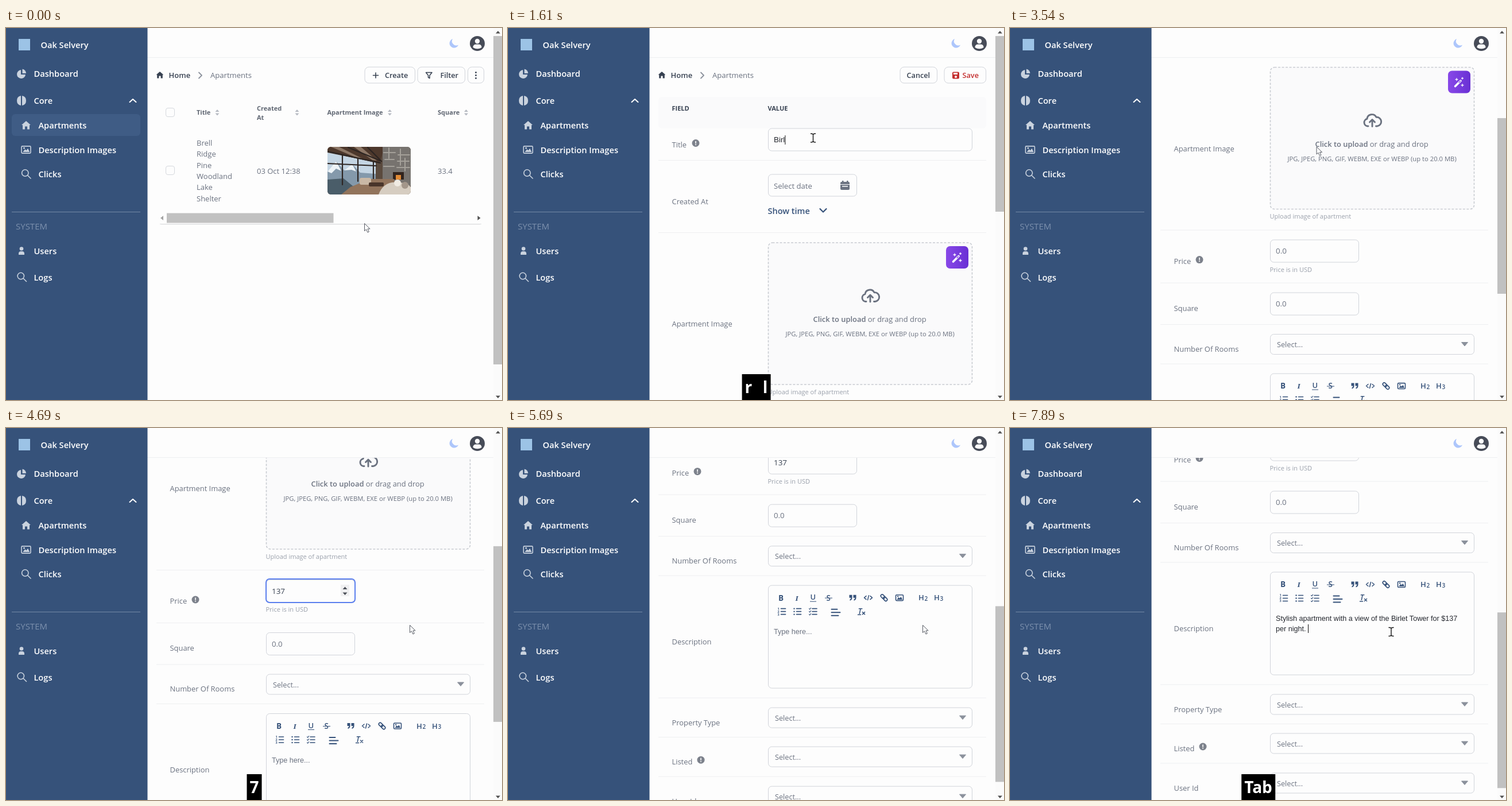
Animation of 864 by 648 pixels, one loop 8000 ms. Source, as an HTML page:

```html
<!DOCTYPE html>
<html lang="en">
<head>
<meta charset="utf-8">
<style>
html, body { margin: 0; width: 864px; height: 648px; overflow: hidden; background: #fdfdfd; }
#stage { position: relative; width: 864px; height: 648px; overflow: hidden; }
svg { display: block; font-family: "Open Sans", "Noto Sans", sans-serif; }
text { white-space: pre; }
.arial { font-family: "Liberation Sans", Arial, sans-serif; }
#keys { position: absolute; left: 432.5px; top: 603px; height: 45px; padding: 0 5.5px; transform: translateX(-50%);
  background: #000; color: #fff; font: 700 28px/44px "Open Sans", "Noto Sans", sans-serif; white-space: pre; word-spacing: 2px; }
</style>
</head>
<body>
<div id="stage"><div id="keys"></div></div>
<script>
const NAVY = '#36527a', GREY = '#6b7280', DARK = '#374151', LINE = '#eeeff1', EDGE = '#d1d4da', ICON = '#c9d2de';
const LOOP = 8000;

// Drawing helpers; text is placed by its left edge and vertical centre
const text = (x, y, s, size = 12.9, fill = GREY, weight = 400, more = '') =>
  `<text x="${x}" y="${y + size * .36}" font-size="${size}" fill="${fill}" font-weight="${weight}" ${more}>${s}</text>`;
const rect = (x, y, w, h, fill, rx = 0, more = '') =>
  `<rect x="${x}" y="${y}" width="${w}" height="${h}" rx="${rx}" fill="${fill}" ${more}/>`;
const box = (x, y, w, h, rx = 6, more = '') =>
  rect(x + .5, y + .5, w - 1, h - 1, '#fdfdfd', rx, `stroke="${EDGE}" ${more}`);
const fill = (d, color, more = '') => `<path d="${d}" fill="${color}" ${more}/>`;
const stroke = (d, color, w = 1.5, more = '') =>
  `<path d="${d}" fill="none" stroke="${color}" stroke-width="${w}" stroke-linecap="round" stroke-linejoin="round" ${more}/>`;
const disc = (x, y, r, color) => `<circle cx="${x}" cy="${y}" r="${r}" fill="${color}"/>`;
const hline = (x1, x2, y, color = LINE) => rect(x1, y, x2 - x1, 1, color);

const lens = (x, y) => stroke(`M${x + 3.5} ${y + 3}l5 5M${x + 4.5} ${y - 1.5}a5.7 5.7 0 1 1 -11.4 0a5.7 5.7 0 1 1 11.4 0`, ICON, 1.6);
const house = (x, y, c, k = 1) =>
  fill('M0-7.5L8-.5H6V7H2V2H-2V7H-6V-.5H-8Z', c, `transform="translate(${x} ${y}) scale(${k})"`);
const person = (x, y, c) => disc(x, y - 3.5, 3.3, c) + fill(`M${x - 5} ${y + 7}v-2q0-4 4-4h2q4 0 4 4v2z`, c);
const picture = (x, y, w, c) => rect(x - w / 2, y - w * .38, w, w * .76, 'none', 1.5, `stroke="${c}" stroke-width="1.6"`) +
  fill(`M${x - w * .36} ${y + w * .25}l${w * .25}-${w * .3}l${w * .14} ${w * .13}l${w * .16}-${w * .22}l${w * .2} ${w * .39}z`, c) +
  disc(x - w * .22, y - w * .17, w * .09, c);
const sorter = (x, y) => fill(`M${x - 3.5} ${y - 1}l3.5-4l3.5 4zM${x - 3.5} ${y + 1.5}l3.5 4l3.5-4z`, '#b5b9c1');
const info = (x, y) => disc(x, y, 6.5, '#7d828c') + rect(x - .8, y - 3.6, 1.6, 4.4, '#fff') + disc(x, y + 2.8, 1, '#fff');
const select = y => box(453, y, 356, 36) + text(465, y + 18.5, 'Select...', 12.7) +
  fill(`M786.500 ${y + 14.5}h11l-5.500 6.500z`, '#8b919c', 'stroke="#8b919c" stroke-linejoin="round"');

function sidebar() {
  const item = (x, y, s) => text(x + .4, y, s, 14.65, '#fff', 600);
  return rect(0, 0, 246.5, 648, NAVY) + rect(22, 19, 20, 20, '#9cc3e6') + item(60, 29.5, 'Oak Selvery') +
    fill('M26 73a7.5 7.5 0 1 0 8 8h-8z', ICON) + fill('M28.5 71.5a7.5 7.5 0 0 1 6.5 7.5h-6.5z', ICON) + item(48, 80, 'Dashboard') +
    fill('M26 118q-7 1-7 8.5t7 8.5zM28 118q7 1 7 8.5t-7 8.5z', ICON) + item(48, 127, 'Core') +
    stroke('M215.500 129l5.500-5l5.500 5', '#fff', 2) +
    rect(10, 150, 224, 38, '#3f5c85', 6, 'id="active"') +
    house(35, 169.5, ICON) + item(56, 170, 'Apartments') +
    picture(35, 212, 16, ICON) + item(56, 212.5, 'Description Images') +
    lens(34.5, 254) + item(56, 255, 'Clicks') +
    hline(10, 234, 320, '#7389a6') + text(17, 345.5, 'SYSTEM', 15, '#7c90ad', 500) +
    person(27, 388, ICON) + item(48, 388.5, 'Users') + lens(27, 433.5) + item(48, 435, 'Logs');
}

function topBar() {
  return rect(246, 0, 603, 51, '#fdfdfd') + hline(246, 849, 51) +
    fill('M778 19a8 8 0 1 0 10 10.500a7.500 7.500 0 0 1-10-10.500z', '#adc6fb') +
    disc(821, 27, 13, '#474c58') + disc(821, 23, 4.2, '#fdfdfd') + fill('M813.500 34q0-5.500 5-5.500h5q5 0 5 5.500q-7.500 4.500-15 0z', '#fdfdfd');
}

const crumbs = () => house(268, 82, DARK, .8) + text(283.5, 82.5, 'Home', 13, DARK, 600) +
  stroke('M336 77.500l5 5l-5 5', '#8b919c', 1.8) + text(356, 82.5, 'Apartments', 13.1, GREY, 500);

function cabin() {
  return `<clipPath id="round"><rect x="560" y="207" width="145" height="83" rx="6"/></clipPath><g clip-path="url(#round)">` +
    rect(560, 207, 145, 83, '#5a4a3e') + fill('M560 217L644 234V267L560 284Z', '#c4d5e3') +
    fill('M560 250l15-18l14 16l14-11l14 15l27 2v14l-84 16z', '#8499ab') + fill('M560 250l15-18l9 17l-9-4l-8 8zM589 248l14-11l7 13l-8-3z', '#edf3f7') +
    fill('M560 290v-26l28-2l34 28z', '#4a5d69') + fill('M560 207H660L650 236L560 216Z', '#4d382c') +
    fill('M566 207h14l40 20l-9-1zM606 207h12l28 24l-8-1z', '#8d7766') +
    stroke('M560 215l92 20M596 208l58 24M630 208l22 22M586 220v53M613 227v40M640 232v32M560 236l85 4', '#2d2522', 2.2) +
    rect(656, 207, 49, 68, '#77736f') +
    stroke('M658 217h20m5 4h20M660 229h16m6 3h20M658 241h18m5 2h22M667 209v18M687 211v28M695 227v22', '#a4a099', 2) +
    rect(674, 251, 19, 13, '#31231d') + rect(679, 256, 9, 8, '#e18a35') + fill('M600 277l34-14h42v27h-92z', '#92745c') +
    rect(616, 261, 20, 12, '#c9b8a5', 3) + rect(632, 269, 26, 7, '#49352a', 2) + fill('M649 290q9-23 32-21q18 0 24 8v13z', '#d6cdc1') +
    disc(682, 270, 6, '#f0ebe3') + disc(695, 274, 6, '#a3968a') + '</g>';
}

function listPage() {
  const head = (x, y, s) => text(x, y, s, 11, '#5f6672', 700);
  const check = y => rect(278.5, y + .5, 15, 15, '#fdfdfd', 3.5, 'stroke="#d5d8dd"');
  const words = ['Brell', 'Ridge', 'Pine', 'Woodland', 'Lake', 'Shelter'];
  return crumbs() + box(624.5, 67.5, 88.5, 29, 7, 'id="create"') + stroke('M639.500 82.500h9M644 78v9', DARK, 1.6) + text(660, 82.5, 'Create', 12.7, DARK, 600) +
    box(716.5, 67.5, 83.5, 29, 7) + stroke('M731.500 77.500h10.500l-4 5v5l-2.500-1.500v-3.500z', DARK) + text(756.5, 82.5, 'Filter', 12.7, DARK, 600) +
    box(804, 67.5, 29, 29, 7) + [77.5, 82.5, 87.5].map(y => disc(818.5, y, 1.4, DARK)).join('') +
    check(139) + check(240) + head(332, 147.5, 'Title') + head(437, 140, 'Created') + head(437, 156, 'At') +
    head(559.5, 147.5, 'Apartment Image') + head(752, 147.5, 'Square') + [368, 507, 668.5, 801.5].map(x => sorter(x, 147)).join('') +
    words.map((s, i) => text(332, 200 + i * 19.45, s, 13)).join('') + text(437, 249, '03 Oct 12:38', 13) + text(752, 249, '33.4', 13) + cabin() +
    rect(280, 322.5, 290.5, 17, '#c1c1c1') + fill('M274 327v8l-5-4z', '#a3a3a3') + fill('M821.500 327v8l5-4z', '#505050') +
    hline(268, 828, 341, '#dcdddf') + hline(270, 826, 342, '#f1f1f2');
}

function editor() {
  const a = 929, b = 953, c = NAVY;
  const lines = x => [-5, 0, 5].map(d => stroke(`M${x} ${b + d}h8`, c, 1.6)).join('');
  const bold = (x, s, more = '') => text(x, a, s, 13.5, c, 700, more);
  const quote = x => fill(`M${x} ${a - 5}h5v5q0 4-4 5v-2q2-1 2-3h-3z`, c);
  const link = x => rect(x, a - 2.5, 8, 5, 'none', 2.5, `stroke="${c}" stroke-width="1.7"`);
  return box(453, 907, 356, 180) + bold(471, 'B') + bold(500.5, 'I', 'font-style="italic" font-family="Liberation Serif,serif"') +
    text(526.5, a - 1, 'U', 13, c, 600) + hline(526, 537, a + 6, c) + text(554.5, a, 'S', 13.5, c, 600) + hline(552, 565, a, c) +
    quote(594.5) + quote(601.5) +
    stroke(`M624 ${a - 3}l-3.500 3l3.500 3M631 ${a - 3}l3.500 3l-3.500 3M628.500 ${a - 4}l-2 8`, c) +
    `<g transform="rotate(45 655 ${a})">` + link(648) + link(654) + '</g>' + picture(682, a, 13, c) +
    text(715, a, 'H', 13, c, 600) + text(725.5, a + 1.5, '2', 10, c, 600) + text(742, a, 'H', 13, c, 600) + text(752.5, a + 1.5, '3', 10, c, 600) +
    lines(475.5) + [1, 2, 3].map((n, i) => text(469.5, b - 5 + i * 5, n, 5.5, c, 700)).join('') +
    lines(502.5) + [-5, 0, 5].map(d => disc(498.5, b + d, 1.2, c)).join('') +
    lines(530) + [-5, 0, 5].map(d => stroke(`M524.500 ${b + d}l1.200 1.200l2-2.500`, c, 1.1)).join('') +
    stroke(`M563.500 ${b - 4}h10M563.500 ${b + 1.5}h15M563.500 ${b + 7}h12`, c, 2) +
    text(609.5, b - 1, 'T', 13.5, c, 600, 'font-style="italic"') + stroke(`M609.500 ${b + 5.5}h5M617.500 ${b + 1}l4 4m0-4l-4 4`, c);
}

function formPage() {
  const labels = [['Title', 203], ['Created At', 302], ['Apartment Image', 515.5], ['Price', 711.5], ['Square', 793.5],
    ['Number Of Rooms', 864.5], ['Description', 1005.5], ['Property Type', 1146.5], ['Listed', 1214.5], ['User Id', 1283.5]];
  return rect(262, 120, 571, 55, '#fafafb', 6) + crumbs() +
    box(682.5, 67.5, 65.5, 29, 7) + text(694.5, 82.5, 'Cancel', 12.7, DARK, 600) +
    box(759.5, 67.5, 73.5, 29, 7) + rect(774, 76.5, 12, 12, '#c42f2f', 2) + rect(776, 78, 7, 3, '#fff') + disc(780, 85, 2, '#fff') +
    text(791.5, 82.5, 'Save', 12.7, '#c42f2f', 600) +
    text(285.5, 140, 'FIELD', 11, DARK, 700) + text(452.5, 140, 'VALUE', 11, DARK, 700) +
    labels.map(([s, y]) => text(285.5, y, s)).join('') + info(327, 200.5) + info(330, 709) + info(336, 1211.5) +
    [230, 356, 657, 749, 821.5, 890, 1103, 1171.5, 1240].map(y => hline(262, 833, y)).join('') +
    box(453, 174.5, 356, 40) +
    box(453, 254.5, 155, 39) + text(463, 275, 'Select date', 13.1) +
    rect(579, 268, 16, 14, GREY, 2) + rect(582, 266, 2.5, 4, GREY) + rect(590, 266, 2.5, 4, GREY) + hline(579, 595, 272, '#fdfdfd') + rect(582, 275, 10, 1.5, '#fdfdfd') +
    text(452.5, 318.5, 'Show time', 14.5, NAVY, 600) + stroke('M543.500 315l5.500 5.500l5.500-5.500', NAVY, 2.2) +
    rect(453.5, 374, 355, 247, '#fafafb', 7, 'stroke="#c9ccd2" stroke-width="1.6" stroke-dasharray="4 2.500"') +
    rect(763, 380, 39, 39, 'url(#purple)', 7) + stroke('M775.500 407l9.500-9.500', '#fff', 3.6) + stroke('M782 400.500l2.500-2.500', '#7c3fe0', 1.3) +
    stroke('M778 393v4m-2-2h4M788 391.500v3m-1.500-1.500h3M788 403v4m-2-2h4', '#fff', 1.3) +
    stroke('M624 476.500h-1a6.500 6.500 0 0 1-1-12.800a8.500 8.500 0 0 1 16-3a7.800 7.800 0 0 1 1.500 15.800h-2M631 477v-11.500m-4.500 4l4.500-4.500l4.500 4.500', GREY, 2.9) +
    text(531.5, 507.5, 'Click to upload<tspan font-weight="400"> or drag and drop</tspan>', 12.9, GREY, 600) +
    text(483.5, 533, 'JPG, JPEG, PNG, GIF, WEBM, EXE or WEBP (up to 20.0 MB)', 11.25) +
    text(452.5, 634, 'Upload image of apartment', 11, '#9aa0ab') +
    box(453, 674, 155, 40) + text(463, 694, '', 13.4, DARK, 400, 'id="price"') +
    `<g id="focus">${rect(453, 673, 155, 41, 'none', 6, 'stroke="#5b7fee" stroke-width="2"') +
      rect(583, 683, 15, 20, '#f0f0f1') + fill('M586.500 691l4-4.500l4 4.500zM586.500 696.500l4 4.500l4-4.500z', '#4b4f57')}</g>` +
    text(452.5, 726.5, 'Price is in USD', 11, '#9aa0ab') +
    box(453, 766, 155, 40) + text(463, 786, '0.0', 13.2) + [838.5, 1120, 1188, 1257].map(select).join('') + editor() +
    text(463, 194.5, '<tspan id="typed"></tspan><tspan id="hint" fill="#9ca3af"></tspan>', 13.4, '#24272e', 400, 'class="arial"') +
    text(463, 988, '', 12.6, DARK, 400, 'class="arial" id="line1"') + text(463, 1006, '', 12.6, DARK, 400, 'class="arial" id="line2"') +
    rect(0, 187, 1, 16, '#111', 0, 'id="titleCaret"') + rect(0, 0, 1, 15, '#111', 0, 'id="bodyCaret"');
}

const BEAM = 'M-4-7.500q4 0 4 2q0-2 4-2M0-5.500v11M-4 7.500q4 0 4-2q0 2 4 2';

document.getElementById('stage').insertAdjacentHTML('afterbegin', `<svg width="864" height="648">
  <defs><linearGradient id="purple"><stop offset="0" stop-color="#8848e8"/><stop offset="1" stop-color="#6930d4"/></linearGradient></defs>
  <rect width="864" height="648" fill="#fdfdfd"/>
  <g id="list">${listPage()}</g><g id="form">${formPage()}</g>${topBar()}${sidebar()}
  ${rect(849, 0, 15, 648, '#fbfbfb') + rect(849, 14, 15, 572, '#c1c1c1', 0, 'id="thumb"')}
  ${fill('M853 9.500h8l-4-4.500zM853 640.500h8l-4 4.500z', '#505050')}
  <g id="arrow">${fill('M.5.500v13l3-2.700l2.400 5.200l2.400-1l-2.300-5.100h4.100z', '#fff', 'stroke="#555962"')}</g>
  <g id="beam">${stroke(BEAM, '#fff', 3.2) + stroke(BEAM, '#111', 1.4)}</g></svg>`);

const el = id => document.getElementById(id);
const show = (id, on) => el(id).style.display = on ? '' : 'none';
const put = (id, s) => { if (el(id).textContent !== s) el(id).textContent = s; };
const between = (t, a, b) => t >= a && t < b;
const part = (t, a, b) => Math.min(1, Math.max(0, (t - a) / (b - a)));
const smooth = p => p * p * (3 - 2 * p);
const latest = (steps, t) => steps.reduce((v, [at, next]) => t >= at ? next : v, '');

const TITLE = 'Birlet Tower View Apartments';
const BODY = ['Stylish apartment with a view of the Birlet Tower for $137', 'per night. '];
const titleLength = [[1350, 1], [1430, 2], [1500, 3], [1560, 4], [2300, TITLE.length]];
const priceSteps = [[0, '0.0'], [4250, '1'], [4350, '13'], [4450, '137']];
const keySteps = [[1300, 'Left Shift'], [1400, 'Left Shift  B'], [1500, 'Left Shift  B  i'], [1610, 'r  l'], [1750, 'l'], [2060, ''],
  [2220, 'Tab'], [3020, ''], [4250, '1'], [4350, '1  3'], [4450, '1  3  7'], [4690, '7'], [4890, ''], [7810, 'Tab']];
const path = [[240, 624, 340], [600, 648, 80], [820, 642, 84], [1080, 553, 158], [1250, 531.5, 191.5], [3450, 531.5, 191.5],
  [3820, 545, 290], [4000, 530, 286], [4500, 545, 288], [4650, 660, 320], [4690, 703, 343], [4850, 722, 343],
  [6010, 722, 343], [6090, 674.5, 356], [6330, 664, 355]];

function pointer(t) {
  const i = path.findIndex(k => t < k[0]);
  if (i < 1) return (i ? path[path.length - 1] : path[0]).slice(1);
  const [a, b] = [path[i - 1], path[i]], p = smooth(part(t, a[0], b[0]));
  return [1, 2].map(n => a[n] + (b[n] - a[n]) * p);
}

function draw(t) {
  const editing = t >= 760;
  show('list', !editing); show('active', !editing); show('form', editing);
  el('create').setAttribute('fill', t >= 520 ? '#f1f2f4' : '#fdfdfd');

  const scroll = 410 * smooth(part(t, 2985, 3815)) + 246.5 * (1 - (1 - part(t, 5150, 5930)) ** 2);
  el('form').setAttribute('transform', `translate(0 ${-scroll})`);
  el('thumb').setAttribute('y', 14 + scroll * .468);
  el('thumb').setAttribute('height', editing ? 306 : 572);

  const n = +latest(titleLength, t);
  put('typed', TITLE.slice(0, n));
  put('hint', t >= 1790 ? TITLE.slice(n) : '');
  show('titleCaret', between(t, 1250, 2820));
  if (editing) el('titleCaret').setAttribute('x', 463 + (n ? el('typed').getComputedTextLength() : 0));

  put('price', latest(priceSteps, t));
  el('price').setAttribute('fill', t < 4250 ? GREY : DARK);
  show('focus', between(t, 3940, 4890));

  const offered = t >= 7170, accepted = t >= 7850;
  put('line1', offered ? BODY[0] : 'Type here...');
  put('line2', offered ? BODY[1] : '');
  const ink = accepted ? '#24272e' : offered ? '#9ca3af' : GREY;
  el('line1').setAttribute('fill', ink);
  el('line2').setAttribute('fill', ink);
  show('bodyCaret', between(t, 6250, 6770) || accepted);
  el('bodyCaret').setAttribute('x', accepted ? 463 + el('line2').getComputedTextLength() : 463);
  el('bodyCaret').setAttribute('y', accepted ? 998.5 : 980.5);

  const keys = latest(keySteps, t);
  put('keys', keys);
  show('keys', keys);

  const beam = between(t, 1150, 3450) || between(t, 3860, 4560) || t >= 6010;
  show('beam', beam); show('arrow', !beam);
  el(beam ? 'beam' : 'arrow').setAttribute('transform', `translate(${pointer(t)})`);
}

function tick() {
  draw(performance.now() % LOOP);
  requestAnimationFrame(tick);
}
tick();
</script>
</body>
</html>
```
